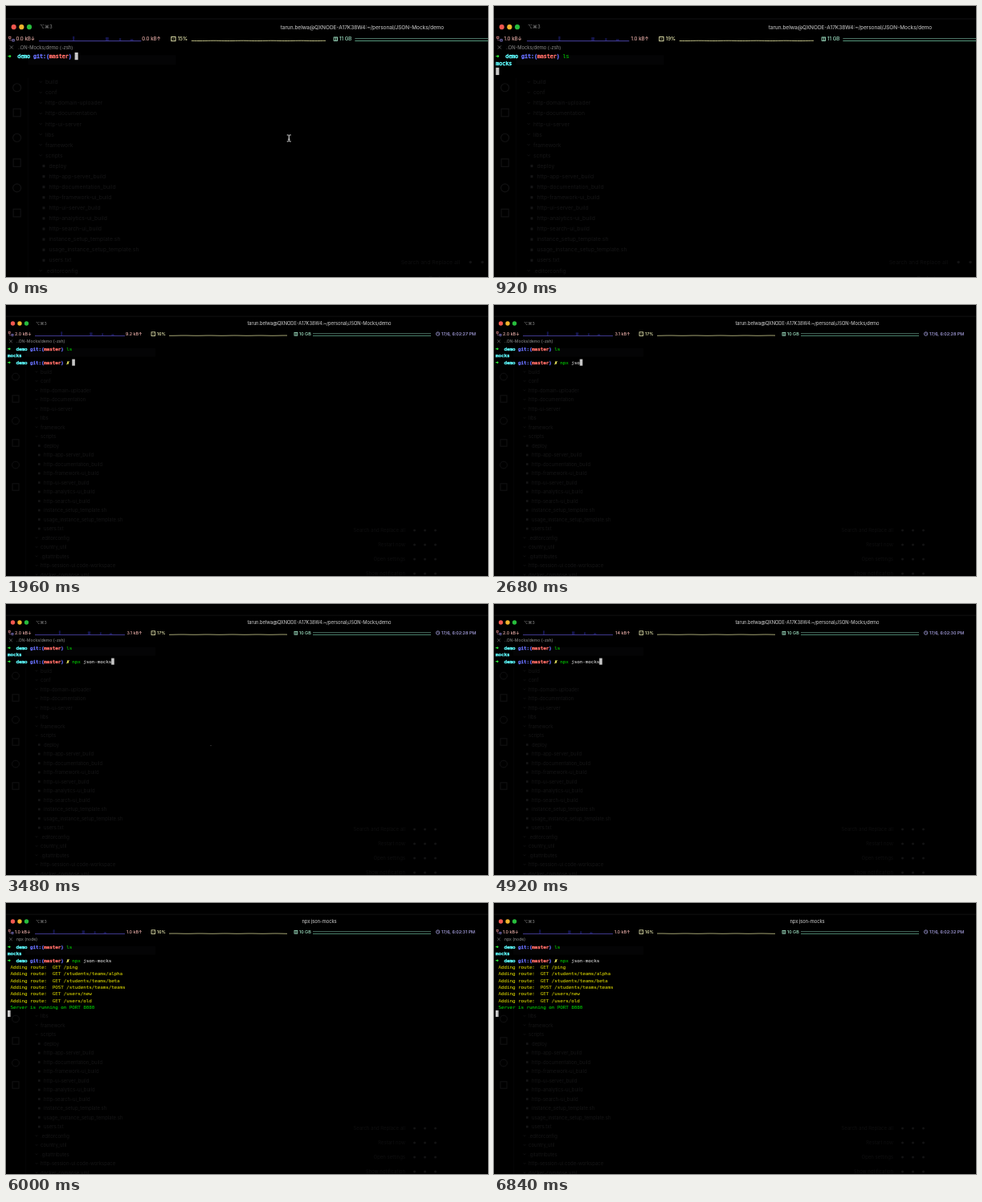
Animation, 600 px wide and 338 px high, one loop 6.88 s. Source, as an HTML page with a canvas:

```html
<!DOCTYPE html>
<html lang="en">
<head>
<meta charset="utf-8">
<title>Terminal demo</title>
<style>
  html, body { margin: 0; width: 100%; height: 100%; overflow: hidden; background: #000; }
  canvas { display: block; width: 600px; height: 338px; }
</style>
</head>
<body>
<canvas id="stage"></canvas>
<script>
const W = 600, H = 338, LOOP = 6880;
const ZOOM = 1.137, ZOOM_START = 980, ZOOM_END = 1470;
const SANS = 'Inter, Roboto, "DejaVu Sans", sans-serif';
const MONO = '"DejaVu Sans Mono", "Liberation Mono", monospace';
const CELL = 3.49, LEFT = 2, ROW = 8.29, FIRST = 57.2;
const REGULAR = 0.1, BOLD = 0.42;

const GREEN = '#00c200', YELLOW = '#c7c400', CYAN = '#5ffdff', BLUE = '#6871ff';
const RED = '#ff6d67', LIME = '#2ff53c', LEMON = '#fffc67', WHITE = '#c7c7c7';

// Moments of the session, in ms
const MOUSE_HIDE = 300, L_KEY = 340, S_KEY = 540, LS_ENTER = 780, PROMPT = 1040;
const NPX_START = 2240, KEY_GAP = 70, NPX_ENTER = 5160, OUTPUT = 5640;
const TICK = 1000, FIRST_TICK = 660;

const USER_TITLE = 'tarun.belwa@QXNODE-A17K38W4:~/personal/JSON-Mocks/demo';
const COMMAND = 'npx json-mocks';
const ROUTES = ['GET /ping', 'GET /students/teams/alpha', 'GET /students/teams/beta',
  'POST /students/teams/teams', 'GET /users/new', 'GET /users/old'];

// Download, upload, processor and memory, one row per tick
const STATS = [
  ['0.0', '0.0', 15, 11], ['1.0', '1.0', 19, 11], ['2.0', '9.2', 16, 10],
  ['2.0', '3.1', 17, 10], ['2.0', '3.1', 17, 10], ['2.0', '14', 13, 10],
  ['1.0', '1.0', 16, 10], ['1.0', '1.0', 16, 10]
];

const FILES = ['build', 'conf', 'http-domain-uploader', 'http-documentation', 'http-ui-server',
  'libs', 'framework', 'scripts', '>deploy', '>http-app-server_build',
  '>http-documentation_build', '>http-framework-ui_build', '>http-ui-server_build',
  '>http-analytics-ui_build', '>http-search-ui_build', '>instance_setup_template.sh',
  '>usage_instance_setup_template.sh', '>users.txt', '.editorconfig', 'country_util',
  '.gitattributes', 'http-session-ui.code-workspace', 'docker-compose.yml'];

const canvas = document.getElementById('stage');
const ctx = canvas.getContext('2d');
const dpr = window.devicePixelRatio || 1;
canvas.width = W * dpr;
canvas.height = H * dpr;

// Text is laid out large and scaled down to keep fractional advances;
// a thin outline gives the soft, heavier look of screen smoothing
function label(str, x, y, size, color, align = 'left', font = SANS, outline = 0) {
  ctx.save();
  ctx.translate(x, y);
  ctx.scale(0.1, 0.1);
  ctx.font = `${size * 10}px ${font}`;
  ctx.textAlign = align;
  ctx.fillStyle = ctx.strokeStyle = color;
  ctx.fillText(str, 0, 0);
  if (outline) {
    ctx.lineWidth = outline * 10;
    ctx.lineJoin = 'round';
    ctx.strokeText(str, 0, 0);
  }
  ctx.restore();
}

function bar(str, x, color, align = 'left', y = 38, size = 5.4) {
  label(str, x, y, size, color, align, SANS, 0.08);
}

function rect(x, y, w, h, color) {
  ctx.fillStyle = color;
  ctx.fillRect(x, y, w, h);
}

function dot(x, y, r, color) {
  ctx.fillStyle = color;
  ctx.beginPath();
  ctx.arc(x, y, r, 0, Math.PI * 2);
  ctx.fill();
}

function ring(x, y, r, color, width) {
  ctx.strokeStyle = color;
  ctx.lineWidth = width;
  ctx.beginPath();
  ctx.arc(x, y, r, 0, Math.PI * 2);
  ctx.stroke();
}

function stroke(points, color, width) {
  ctx.strokeStyle = color;
  ctx.lineWidth = width;
  ctx.beginPath();
  points.forEach(([x, y]) => ctx.lineTo(x, y));
  ctx.stroke();
}

function box(x, y, w, h, color, width = 0.8) {
  ctx.strokeStyle = color;
  ctx.lineWidth = width;
  ctx.strokeRect(x, y, w, h);
}

function term(str, col, row, color, outline = REGULAR) {
  [...str].forEach((ch, i) => {
    if (ch !== ' ') label(ch, LEFT + (col + i) * CELL, FIRST + row * ROW, 6, color, 'left', MONO, outline);
  });
}

function cursor(col, row) {
  rect(LEFT + col * CELL, FIRST + row * ROW - 6.2, 3.6, 8.1, WHITE);
}

function prompt(row, dirty) {
  term('➜', 0, row, LIME, BOLD);
  term('demo', 3, row, CYAN, BOLD);
  term('git:(', 8, row, BLUE, BOLD);
  term('master', 13, row, RED, BOLD);
  term(')', 19, row, BLUE, BOLD);
  if (dirty) term('✗', 21, row, LEMON, BOLD);
}

function backdrop(t) {
  const faint = '#151516';
  rect(0, 13.7, W, 0.8, '#141416');
  rect(24, 54, 162, 10.5, '#040405');
  rect(24, 79, 0.5, H, '#08080a');
  for (let i = 0; i < 6; i++) {
    const y = 89.5 + i * 27.5;
    if (t >= OUTPUT && y < 140) continue;
    if (i % 2) box(8, y - 4.2, 8, 8.4, '#121213', 1);
    else ring(12, y, 4.4, '#121213', 1);
  }
  FILES.forEach((name, i) => {
    const y = 83.5 + i * 11.5;
    if (t >= OUTPUT && y < 135) return;
    const nested = name[0] === '>';
    label(nested ? name.slice(1) : name, nested ? 47 : 43, y + 2, 6, faint);
    if (nested) rect(40, y - 1.4, 2.6, 2.8, faint);
    else stroke([[36.6, y - 1], [38, y + 0.6], [39.4, y - 1]], faint, 0.7);
  });
  ['Search and Replace all', 'Restart now', 'Open settings', 'Show notification'].forEach((name, i) => {
    const y = 281 + i * 18;
    label(name, 497, y + 2, 6, '#0e0e0f', 'right');
    for (let k = 0; k < 3; k++) dot(508.5 + k * 13, y, 1.5, '#131314');
  });
}

function windowBar(t) {
  ['#f0584f', '#f0b42c', '#27bd3d'].forEach((c, i) => dot(8.5 + i * 8.5, 23, 2.7, c));
  label('⌥⌘3', 37, 25, 5.2, '#8a8a8a', 'left', 'Inter, "DejaVu Sans", sans-serif');
  const running = t >= NPX_ENTER;
  bar(running ? COMMAND : USER_TITLE, 390, '#bdbdbd', 'center', 25.4, 5.7);
  stroke([[4.2, 43.5], [7.8, 47.1]], '#858585', 0.6);
  stroke([[7.8, 43.5], [4.2, 47.1]], '#858585', 0.6);
  bar(running ? 'npx (node)' : '..ON-Mocks/demo (-zsh)', 13, '#7d7d7d', 'left', 47.3, 5.1);
}

function statusBar(t) {
  const tick = Math.max(0, Math.floor((t - FIRST_TICK) / TICK) + 1);
  const [down, up, cpu, mem] = STATS[Math.min(tick, STATS.length - 1)];
  const rose = '#f0b4ae', sand = '#eeeeb4', mint = '#a9efcf', lilac = '#b7b0f5';
  const base = 38.3;

  box(3.2, 33.6, 2, 2, '#d98585', 0.7);
  box(7, 36.6, 2, 2, '#8d84e0', 0.7);
  stroke([[4.2, 35.8], [4.2, 37.6], [6.8, 37.6]], '#a97595', 0.5);
  bar(`${down} kB↓`, 11, rose);
  bar(`${up} kB↑`, 169.5, rose, 'right');
  [73, 109, 124, 136].forEach((x, i) => {
    const h = 2 + (i * 7 + 3) % 4;
    rect(x - tick * 2.4, base - h, i % 2 ? 3.4 : 2, h, '#15154c');
  });
  rect(36, base - 0.3, 112, 0.8, '#4f47b0');

  box(181, 33.8, 4.6, 4.6, sand);
  rect(182.6, 35.4, 1.4, 1.4, '#77774e');
  bar(`${cpu}%`, 188, sand);
  const load = [];
  for (let x = 203; x <= 352; x += 3) {
    const k = x / 3 + tick;
    load.push([x, base - 0.15 - 0.12 * Math.sin(k * 0.6)]);
  }
  stroke(load, '#cfcf90', 0.8);

  box(359, 34.3, 3.8, 3.8, mint);
  rect(360.6, 34.3, 0.7, 3.8, mint);
  bar(`${mem} GB`, 365, mint);
  rect(382, 35.3, 147, 0.7, '#5f8f7e');
  rect(382, base - 0.4, 147, 0.8, '#5fa98b');

  ring(537.6, 36, 2.2, lilac, 0.7);
  stroke([[537.6, 34.6], [537.6, 36], [538.7, 36.4]], lilac, 0.5);
  bar(`17/6, 6:02:${25 + tick} PM`, 542, lilac);
}

function session(t) {
  prompt(0, false);
  if (t >= S_KEY) term('ls', 21, 0, GREEN);
  else if (t >= L_KEY) term('l', 21, 0, '#c91b00');
  if (t < LS_ENTER) {
    cursor(21 + (t >= L_KEY) + (t >= S_KEY), 0);
    return;
  }

  term('mocks', 0, 1, CYAN, BOLD);
  if (t < PROMPT) {
    cursor(0, 2);
    return;
  }

  prompt(2, true);
  const typed = Math.max(0, Math.min(COMMAND.length, Math.floor((t - NPX_START) / KEY_GAP) + 1));
  term(COMMAND.slice(0, Math.min(typed, 3)), 23, 2, typed < 3 ? '#c91b00' : GREEN);
  term(COMMAND.slice(3, Math.max(typed, 3)), 26, 2, WHITE);
  if (t < NPX_ENTER) cursor(23 + typed, 2);
  else if (t < OUTPUT) cursor(0, 3);
  else {
    ROUTES.forEach((route, i) => term('Adding route:  ' + route, 1, 3 + i, YELLOW));
    term('Server is running on PORT 8080', 1, 9, GREEN);
    cursor(0, 10);
  }
}

function pointer(t) {
  if (t < MOUSE_HIDE) {
    const x = 309.8, y = 145;
    rect(x - 0.5, y - 3.5, 1, 7, '#d8d8d8');
    for (const s of [-1, 1]) {
      rect(x - 2.2, y + s * 3.5 - 0.4, 1.7, 0.9, '#d8d8d8');
      rect(x + 0.5, y + s * 3.5 - 0.4, 1.7, 0.9, '#d8d8d8');
    }
    rect(x - 1.3, y + 0.8, 2.6, 0.7, '#d8d8d8');
  } else if (t >= 3400 && t < 3760) {
    dot(255, 176.6, 0.7, '#4a4a4a');
  }
}

function zoomAt(t) {
  const p = Math.max(0, Math.min(1, (t - ZOOM_START) / (ZOOM_END - ZOOM_START)));
  const ease = p * p * (3 - 2 * p);
  return ZOOM + (1 - ZOOM) * ease;
}

function draw(t) {
  ctx.setTransform(dpr, 0, 0, dpr, 0, 0);
  rect(0, 0, W, H, '#000');
  const z = zoomAt(t);
  ctx.scale(z, z);
  backdrop(t);
  windowBar(t);
  statusBar(t);
  session(t);
  pointer(t);
}

const start = performance.now();
function loop() {
  draw((performance.now() - start) % LOOP);
  requestAnimationFrame(loop);
}
loop();
</script>
</body>
</html>
```
